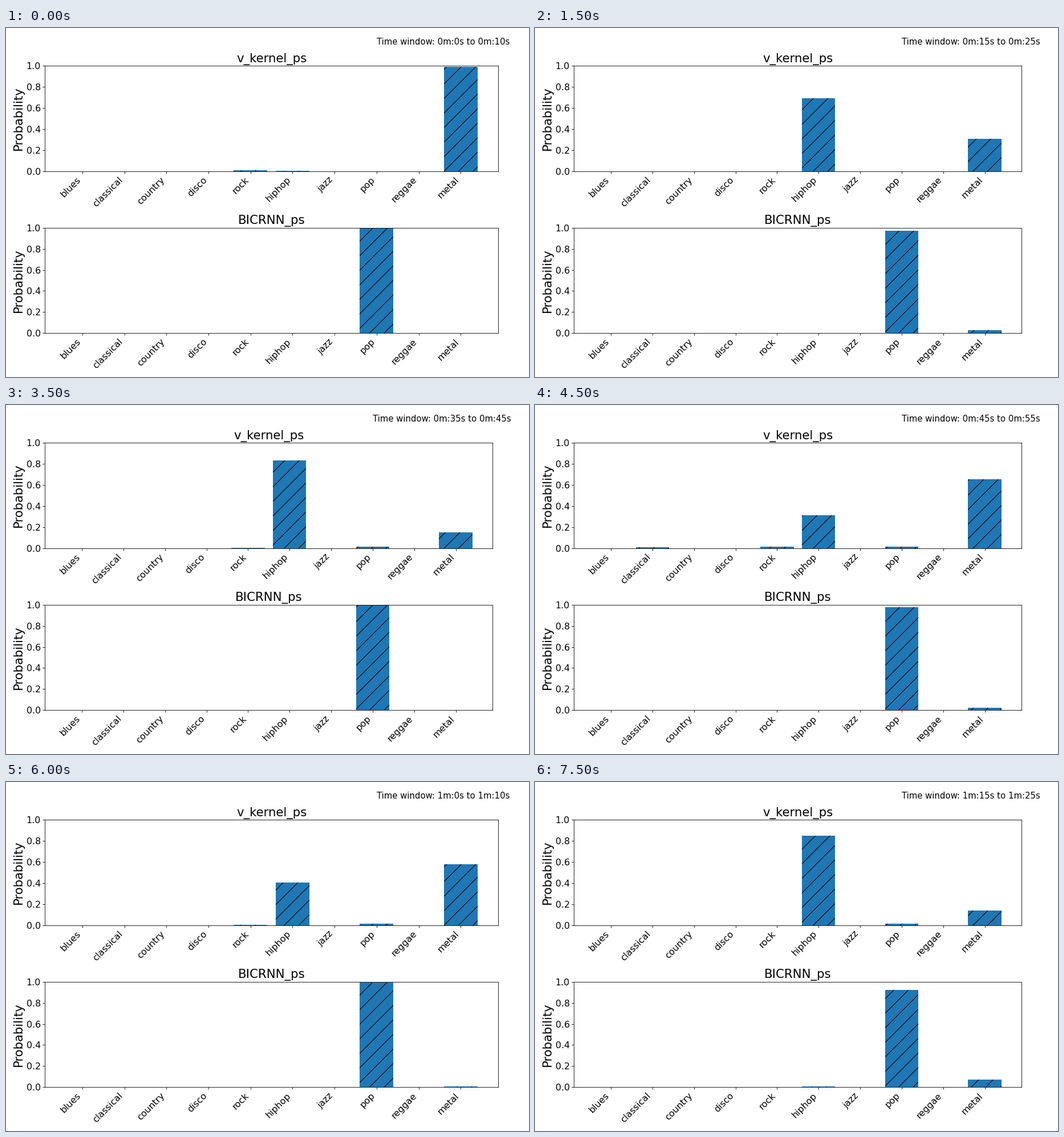
A matplotlib script for the animation above (8 s loop, 917 by 611 pixels).

```python
import numpy as np
import matplotlib.pyplot as plt
from matplotlib.animation import FuncAnimation
from matplotlib.collections import LineCollection

GENRES = ["blues", "classical", "country", "disco", "rock",
          "hiphop", "jazz", "pop", "reggae", "metal"]
STEPS = 16
WIDTH, HEIGHT = 12, 7.9957

plt.rcParams.update({"font.family": "DejaVu Sans",
                     "axes.titlesize": 20, "axes.labelsize": 20,
                     "xtick.labelsize": 15, "ytick.labelsize": 15})
fig, axes = plt.subplots(2, 1, figsize=(WIDTH, HEIGHT), dpi=76.41667)


def path(step, *values):
    """Straight runs between a few key points."""
    return np.interp(step, [0, 2, 5, 7, 10, 12, 15], values)


def bump(step, centre, height, width):
    return height * np.exp(-((step - centre) / width) ** 2)


def kernel_probs(step):
    """Metal against hiphop, with small shares leaking to other genres."""
    probs = {
        "metal": path(step, .988, .364, .190, .152, .903, .576, .140),
        "classical": bump(step, 10, .045, .8),
        "rock": bump(step, 0, .009, 1) + bump(step, 10, .015, 2),
        "pop": .012 * (step > 3) + bump(step, 5, .028, 1),
    }
    probs["hiphop"] = 1 - sum(probs.values())
    return probs


def rnn_probs(step):
    """Nearly all pop; metal takes the rest."""
    pop = path(step, 1, .966, .990, .997, .970, .991, .922)
    hiphop = bump(step, 15, .005, .5)
    return {"pop": pop, "hiphop": hiphop, "metal": 1 - pop - hiphop}


def hatch_lines():
    """Diagonals a third of an inch apart, fixed to the figure's corner."""
    ends = np.arange(1 / 3, WIDTH + HEIGHT, 1 / 3)
    lines = LineCollection([[(x - HEIGHT, 0), (x, HEIGHT)] for x in ends],
                           colors="black", linewidths=1, zorder=1.5,
                           transform=fig.dpi_scale_trans)
    lines.set_in_layout(False)
    return lines


def build(ax, title):
    bars = ax.bar(GENRES, np.ones(len(GENRES)), color="#1f77b4")
    ax.set_ylim(0, 1)
    ax.set_title(title)
    ax.set_ylabel("Probability")
    plt.setp(ax.get_xticklabels(), rotation=45, ha="right")
    hatches = [ax.add_collection(hatch_lines(), autolim=False) for _ in bars]
    return list(zip(GENRES, bars, hatches))


panels = [(build(axes[0], "v_kernel_ps"), kernel_probs),
          (build(axes[1], "BICRNN_ps"), rnn_probs)]
label = axes[0].text(7, 1.2, "", fontsize=14)


def clock(seconds):
    return f"{seconds // 60}m:{seconds % 60}s"


def update(step):
    start = 5 * step
    label.set_text(f"Time window: {clock(start)} to {clock(start + 10)}")
    for columns, model in panels:
        probs = model(step)
        for genre, bar, lines in columns:
            p = probs.get(genre, 0)
            bar.set_height(p)
            lines.set_visible(p > .002)
            lines.set_clip_path(bar)
    # The layout is always fitted from the default margins.
    fig.subplots_adjust(left=.125, right=.9, bottom=.11, top=.88, hspace=.2)
    fig.tight_layout()
    return []


anim = FuncAnimation(fig, update, frames=STEPS, interval=500,
                     repeat=True, repeat_delay=0)
plt.show()
```
